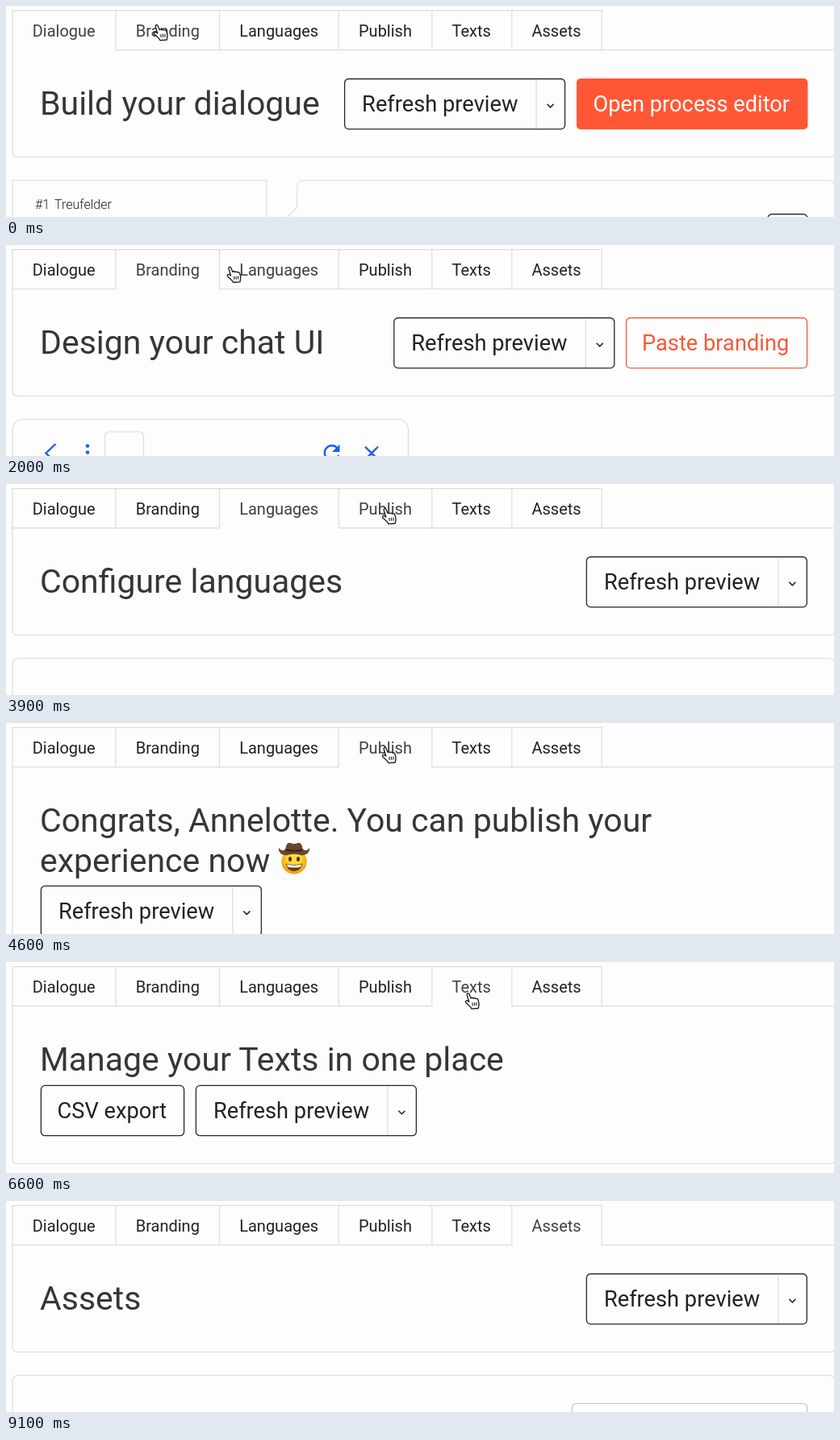
Recreate the animation shown at these times as an HTML page. Size 1026 px wide and 262 px high, loop 9900 ms.

```html
<!DOCTYPE html>
<html lang="en">
<head>
<meta charset="utf-8">
<title>Tab tour</title>
<style>
  html, body { margin: 0; height: 100%; overflow: hidden; background: #fdfdfd; }
  svg { display: block; }
  text { font-family: Roboto, sans-serif; fill: #222; white-space: pre; }
  .tab { font-size: 20px; }
  .tab.soft { fill: #404040; }
  .title { font-size: 41px; fill: #363636; }
  .label { font-size: 27.25px; }
  .small { font-size: 16px; font-weight: 300; }
  .line { fill: none; stroke: #dcdcdc; stroke-width: 1.2; }
  .dark { fill: none; stroke: #262626; stroke-width: 1.3; }
  .blue { fill: none; stroke: #1f5ff0; stroke-width: 2.4; }
</style>
</head>
<body>
<svg id="stage" width="1026" height="262" viewBox="0 0 1026 262"></svg>
<script>
const stage = document.getElementById('stage');
const tabs = ['Dialogue', 'Branding', 'Languages', 'Publish', 'Texts', 'Assets'];
const edges = [8, 136, 264.5, 412.3, 527.8, 626.8, 738.2];
const starts = [0, 900, 2500, 4500, 6500, 8400];
const LOOP = 9900;

// Pointer moves: start, end, target x, target y
const home = [182, 22];
const moves = [
  [1400, 2400, 322, 28],
  [2900, 3900, 465, 29],
  [4900, 5600, 568, 37.5],
  [6900, 7600, 670, 37.5]
];

const text = (cls, x, y, s, extra = '') => `<text class="${cls}" x="${x}" y="${y}" ${extra}>${s}</text>`;
const path = (cls, d, extra = '') => `<path class="${cls}" d="${d}" ${extra}/>`;
const box = (cls, x, y, w, h, r, extra = '') =>
  `<rect class="${cls}" x="${x}" y="${y}" width="${w}" height="${h}" rx="${r}" ${extra}/>`;
const title = (s, y = 135) => text('title', 42, y, s);

const refresh = (x, y) =>
  box('dark', x, y, 273, 62.3, 5) +
  path('line', `M${x + 237.5} ${y + 1}v60.5`) +
  text('label', x + 21.5, y + 40.5, 'Refresh preview') +
  path('dark', `M${x + 251} ${y + 31.3}l4 4 4-4`, 'style="stroke-width:1.6"');

// Panel outline below the tab row, open at the active tab
const panel = (i, bottom) => path('line',
  `M${edges[i]} 54.6H8V${bottom - 6}q0 6 6 6H1021q6 0 6-6V54.6H${edges[i + 1]}`);
const card = box('line', 8, 216.5, 1019, 80, 7);

const cowboy = `<g transform="translate(357 169)">
  <circle cy="3" r="15.7" fill="url(#face)"/>
  <ellipse cx="-5" cy="0" rx="2" ry="3" fill="#5b3210"/>
  <ellipse cx="5" cy="0" rx="2" ry="3" fill="#5b3210"/>
  <path d="M-10 5.5Q0 8.5 10 5.5C9.5 18-9.5 18-10 5.5z" fill="#6d3c12"/>
  <path d="M-9 6.4Q0 9 9 6.4L8.2 9.4Q0 11.8-8.2 9.4z" fill="#fff"/>
  <path d="M-19-14C-15-9-12-11-10.500-13C-10-18-8-21-4.500-20Q0-18 4.500-20C8-21 10-18 10.500-13C12-11 15-9 19-14C20-7 13-4 8-5Q0-7.500-8-5C-13-4-20-7-19-14z" fill="#6b4430"/>
  <path d="M-10.500-13Q0-9.500 10.500-13V-10.500Q0-7.500-10.500-10.500z" fill="#40261b"/>
</g>`;

const pages = [
  panel(0, 187.5) + title('Build your dialogue') + refresh(419.6, 90.5) +
    box('', 707, 90, 286.5, 63.3, 5, 'fill="#ff5736"') +
    text('label', 727.5, 131, 'Open process editor', 'style="fill:#fff"') +
    path('line', 'M8 262V216.5H323V262') +
    text('small', 36, 252, '#1') + text('small', 60, 252, 'Treufelder') +
    path('line', 'M349 262L360.800 250V224.500q0-8 8-8H1019q8 0 8 8V262') +
    box('dark', 944, 258.500, 49, 40, 5),

  panel(1, 187.5) + title('Design your chat UI') + refresh(480.8, 90.5) +
    box('', 768.6, 90.5, 224, 62.3, 5, 'fill="none" stroke="#f8583a" stroke-width="1.3"') +
    text('label', 788, 131, 'Paste branding', 'style="fill:#f8583a"') +
    box('line', 8, 216.5, 490.5, 80, 13) + box('line', 122.5, 232, 48, 60, 5) +
    path('blue', 'M61.500 247L49.500 258.500L61.500 270M445 250.500l16 16M461 250.500l-16 16') +
    path('blue', 'M410.500 252A9 9 0 1 0 412.300 261') +
    path('', 'M413.500 247.500V257H404z', 'fill="#1f5ff0"') +
    [249.5, 257.5].map(y => `<circle cx="101" cy="${y}" r="2.3" fill="#1f5ff0"/>`).join(''),

  panel(2, 187.5) + title('Configure languages') + refresh(719.4, 90.5) + card,

  panel(3, 300) + title('Congrats, Annelotte. You can publish your') +
    title('experience now', 185) + cowboy + refresh(43.4, 202.3),

  panel(4, 250.5) + title('Manage your Texts in one place') +
    box('dark', 43.4, 153.4, 177.2, 62.3, 5) + text('label', 63.5, 193.8, 'CSV export') +
    refresh(235.4, 153.4),

  panel(5, 187.5) + title('Assets') + refresh(719.4, 90.5) + card +
    box('line', 701.5, 251.5, 291.5, 40, 5, 'style="stroke:#c4c4c4"')
];

stage.innerHTML =
  `<defs><radialGradient id="face" cy=".4"><stop offset=".5" stop-color="#ffda38"/>
    <stop offset="1" stop-color="#f2a51e"/></radialGradient></defs>` +
  path('line', `M8 55V5.600H${edges[6]}V55` + edges.slice(1, 6).map(x => `M${x} 5.600V55`).join('')) +
  tabs.map((s, i) => text('tab', edges[i] + 24.7, 38, s)).join('') +
  pages.map(p => `<g class="page">${p}</g>`).join('') +
  `<g id="hand" fill="#fff" stroke="#161616" stroke-width="1.3" stroke-linejoin="round">
    <path d="M3.200 3.600C2.600 1.600 5 .6 6 2.400L8.200 7.600C8.800 6.600 10.600 6.600 11 7.800C11.800 6.800 13.400 7 13.900 8.200C14.900 7.400 16.500 7.900 16.900 9.400C17.600 12 18.600 14 17.900 16.500L17.200 20L9 20.600C7.600 18 4.600 15.500 2 13.200C.6 11.900 2.200 9.800 4 10.800L5.800 12z"/>
    <path d="M9.800 13l.5 4M12.300 12.800l.4 4M14.800 12.600l.3 4" stroke-width="1.100"/>
  </g>`;

const hand = document.getElementById('hand');
const pageEls = [...stage.querySelectorAll('.page')];
const tabEls = [...stage.querySelectorAll('.tab')];
const clamp = v => Math.min(1, Math.max(0, v));
const ease = v => v * v * (3 - 2 * v);

function draw(now) {
  const t = Math.floor(now % LOOP / 100) * 100;
  const active = starts.filter(s => s <= t).length - 1;
  let [x, y] = home;
  for (const [from, to, tx, ty] of moves) {
    const k = ease(clamp((t - from) / (to - from)));
    x += (tx - x) * k;
    y += (ty - y) * k;
  }
  const over = edges.filter(e => e <= x + 5).length - 1;
  pageEls.forEach((el, i) => el.setAttribute('display', i === active ? 'inline' : 'none'));
  tabEls.forEach((el, i) => el.classList.toggle('soft', i === active || i === over));
  hand.setAttribute('transform', `translate(${x} ${y})`);
  hand.setAttribute('opacity', 1 - clamp((t - 8700) / 400));
}

const begin = performance.now();
function tick() {
  draw(performance.now() - begin);
  requestAnimationFrame(tick);
}
tick();
</script>
</body>
</html>
```
